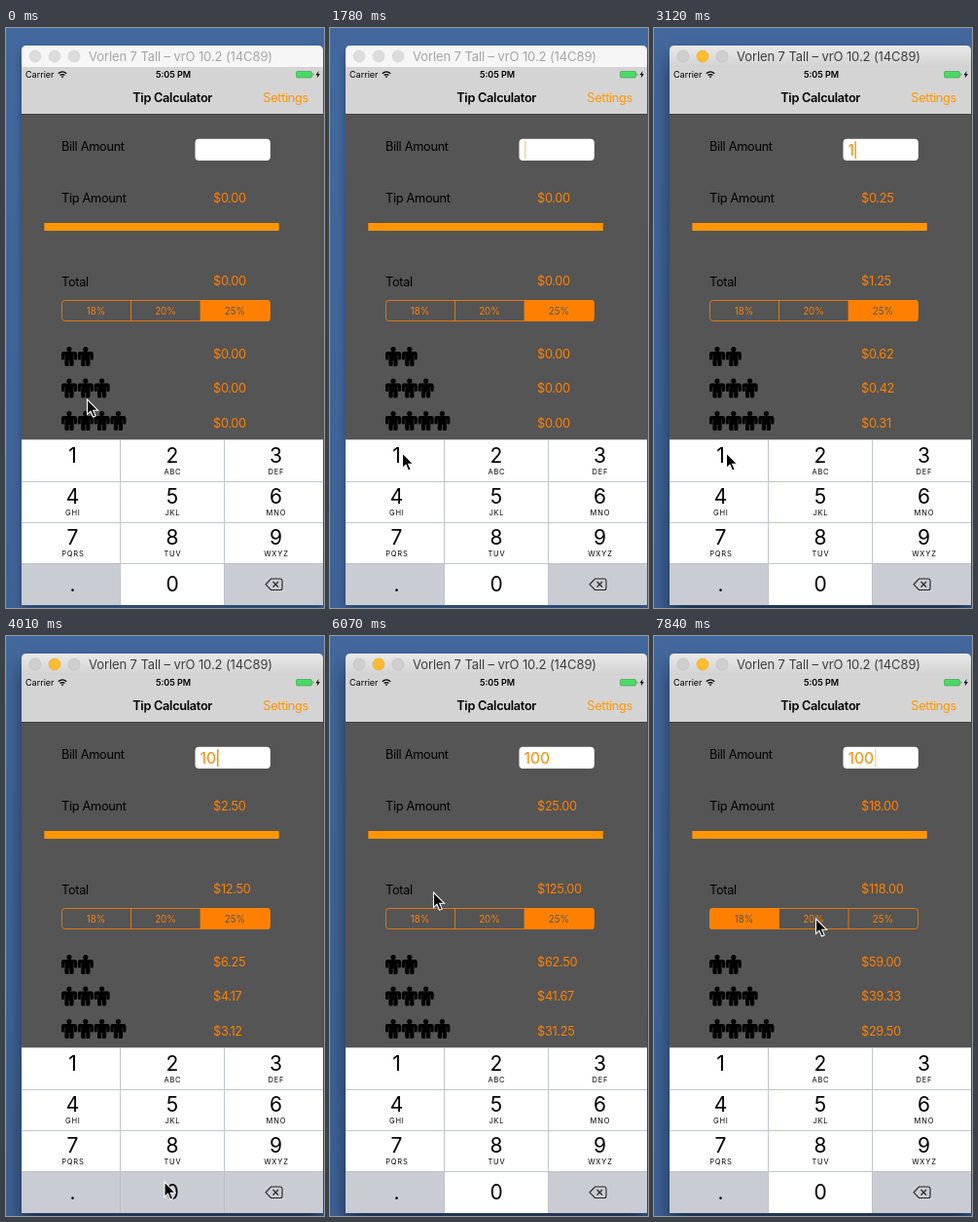
An HTML page for the animation above (7.99 s loop, 327 px wide and 595 px high).

```html
<!DOCTYPE html>
<html lang="en">
<head>
<meta charset="utf-8">
<title>Tip Calculator</title>
<style>
  html, body { margin: 0; width: 100%; height: 100%; overflow: hidden; }
  body { position: relative; background: linear-gradient(#43689d, #3f6296); }
  #window {
    position: absolute; left: 16px; top: 18px; width: 310px; height: 574px;
    border-radius: 5px 5px 0 0;
    box-shadow: 0 5px 9px rgba(0, 0, 0, .3);
  }
  .active #window { box-shadow: 0 13px 20px rgba(0, 0, 0, .5); }
  svg { position: absolute; left: 0; top: 0; }
  text { font: 12.75px Inter, sans-serif; letter-spacing: -.3px; }
  .mid { text-anchor: middle; }
  .end { text-anchor: end; }
  .bold { font-weight: 600; }
  .status { font-size: 9px; letter-spacing: 0; }
  .orange { fill: #ff9500; }
  .value { fill: #ff8000; }
  #bar { fill: #f6f6f6; }
  #caption { fill: #a6a6a6; font-size: 13px; letter-spacing: -.1px; }
  .light { fill: #dcdcdc; stroke: #d0d0d0; stroke-width: .6; }
  .active #bar { fill: url(#chrome); }
  .active #caption { fill: #3e3e3e; }
  .active .light { fill: #cfcfcf; stroke: #bcbcbc; }
  .active .yellow { fill: #fdbc30; stroke: #e6a92b; }
  #bill { fill: #ff8800; font-size: 16px; letter-spacing: 0; }
  .segment { fill: #ff8000; }
  .rate { font-size: 9.75px; letter-spacing: 0; }
  .digit { font-size: 21px; letter-spacing: 0; }
  .letters { font-size: 7.5px; letter-spacing: .8px; }
</style>
</head>
<body>
<div id="window"></div>
<svg width="327" height="595" viewBox="0 0 327 595">
  <defs>
    <linearGradient id="chrome" x2="0" y2="1">
      <stop stop-color="#e9e9e9"/><stop offset="1" stop-color="#d2d2d2"/>
    </linearGradient>
    <clipPath id="control"><rect x="57" y="279" width="215" height="22" rx="3.5"/></clipPath>
    <g id="person">
      <circle cx="8" cy="2.6" r="2.6"/>
      <path d="M2.2 5H13.8Q16 5 16 7.3V12q0 1.6-1.4 1.6-1.4 0-2-1v6q0 1.4-1.4 1.4H9.6q-1.2 0-1.2-1.2V14H7.6v4.8q0 1.2-1.2 1.2H4.8q-1.4 0-1.4-1.4v-6q-.6 1-2 1Q0 13.600 0 12V7.300Q0 5 2.200 5z"/>
      <path d="M3.4 8.500V12.600M12.600 8.500V12.600" stroke="#555" stroke-width=".5"/>
    </g>
  </defs>

  <path id="bar" d="M16 40V23q0-5 5-5H321q5 0 5 5V40z"/>
  <circle class="light" cx="30" cy="29" r="6"/>
  <circle class="light yellow" cx="50" cy="29" r="6"/>
  <circle class="light" cx="70" cy="29" r="6"/>
  <text id="caption" x="85" y="34">Vorlen 7 Tall – vrO 10.2 (14C89)</text>

  <rect x="16" y="40" width="310" height="48" fill="#d4d4d4"/>
  <text class="status" x="20" y="51">Carrier</text>
  <path d="M53.8 46.7q4.2-3.6 8.4 0M55.6 48.6q2.4-2 4.8 0" fill="none" stroke="#000" stroke-width="1.3"/>
  <path d="M56.7 49.8q1.3-1 2.6 0L58 51.3z"/>
  <text class="status bold mid" x="172" y="51">5:05 PM</text>
  <rect x="298.5" y="44.5" width="16" height="6.5" rx="1.2" fill="#4cd964" stroke="#3fa552" stroke-width=".7"/>
  <path d="M315.7 46.3q1.6 1.5 0 3z" fill="#444"/>
  <path d="M321.7 44l-3.2 4.2h2l-.9 3.3 3.3-4.3h-2z"/>
  <text class="bold mid" x="171.2" y="76">Tip Calculator</text>
  <text class="orange end" x="311" y="76">Settings</text>

  <rect x="16" y="88" width="310" height="334" fill="#555"/>
  <path d="M16 88.5H326" stroke="#444"/>
  <text x="57" y="126">Bill Amount</text>
  <text x="57" y="179">Tip Amount</text>
  <text x="57" y="265">Total</text>
  <rect x="194.5" y="113.7" width="77.3" height="22.3" rx="4" fill="#fff"/>
  <text id="bill" x="199.5" y="130.5"></text>
  <rect id="caret" y="116" width="1.5" height="18" fill="#ff8800"/>
  <rect class="orange" x="39.3" y="200" width="241.4" height="8"/>
  <g id="values"></g>
  <g id="segments"></g>
  <g id="people"></g>
  <g id="keys"></g>
  <path id="cursor" d="M0 0V15.4L3.5 12.2 6 18 8.7 16.9 6.2 11.2H11z" stroke="#fff" stroke-width="1.1"/>
</svg>

<script>
const LOOP = 7990;
const RATES = [18, 20, 25];
const CARET_X = [200, 206.5, 217, 227];
const $ = id => document.getElementById(id);

function add(parent, tag, attrs, content = '') {
  const node = document.createElementNS('http://www.w3.org/2000/svg', tag);
  for (const name in attrs) node.setAttribute(name, attrs[name]);
  node.textContent = content;
  return parent.appendChild(node);
}

const values = [179, 264, 339, 374, 410].map(y =>
  add($('values'), 'text', { class: 'value', x: 213, y }));

const segments = RATES.map((rate, i) => {
  const x = 57 + i * 71.5;
  const fill = add($('segments'), 'rect', {
    class: 'segment', x, y: 279, width: 71.5, height: 22, 'clip-path': 'url(#control)' });
  const label = add($('segments'), 'text', {
    class: 'rate mid', x: x + 35.5, y: 293.5 }, rate + '%');
  return { rate, fill, label };
});
add($('segments'), 'rect', {
  x: 57.5, y: 279.5, width: 214, height: 21, rx: 3,
  fill: 'none', stroke: '#ff8000', 'stroke-width': .8 });
add($('segments'), 'path', {
  d: 'M128.5 279.5v21M200 279.5v21', stroke: '#ff8000', 'stroke-width': .8 });

[327, 359.5, 393].forEach((y, row) => {
  for (let i = 0; i < row + 2; i++)
    add($('people'), 'use', { href: '#person', x: 57 + i * 16.8, y });
});

// Keypad: edges of the three columns and four rows.
const COLS = [16, 117.5, 224.5, 326];
const ROWS = [422, 465.5, 507.5, 549.5, 592];
const LETTERS = ['', 'ABC', 'DEF', 'GHI', 'JKL', 'MNO', 'PQRS', 'TUV', 'WXYZ'];
const keys = {};
[...'123456789.0<'].forEach((name, i) => {
  const col = i % 3, row = Math.floor(i / 3);
  const cx = [68.5, 171, 277.5][col];
  const base = [445.5, 488, 530, 577.5][row];
  const rest = '.<'.includes(name) ? '#c9ccd3' : '#fff';
  const rect = add($('keys'), 'rect', {
    x: COLS[col], y: ROWS[row],
    width: COLS[col + 1] - COLS[col], height: ROWS[row + 1] - ROWS[row] });
  keys[name] = { rect, rest };
  if (name === '<') return;
  add($('keys'), 'text', { class: 'digit mid', x: cx, y: base }, name);
  add($('keys'), 'text', { class: 'letters mid', x: cx + .4, y: base + 12 }, LETTERS[i] || '');
});
add($('keys'), 'path', {
  d: 'M117.5 422V592M224.5 422V592M16 422.5H326M16 465.5H326M16 507.5H326M16 549.5H326',
  stroke: '#bfc2c7', 'stroke-width': .8 });
add($('keys'), 'path', {
  d: 'M272.5 565H282q2 0 2 2v7.5q0 2-2 2h-9.5L267 570.8zM274.5 568l5.5 5.5m0-5.5l-5.5 5.5',
  fill: 'none', stroke: '#222', 'stroke-width': 1.1 });

// Tracks hold each value until the next entry: [time, ...value].
const pointer = [
  [0, 83.5, 381], [290, 80, 397], [440, 76, 428], [590, 74.5, 446], [730, 74.5, 440], [880, 74.5, 436],
  [3270, 90, 463], [3420, 125, 515], [3560, 153, 549], [3710, 163, 560],
  [4600, 218, 290], [4750, 247.8, 99.2], [5340, 245, 107], [5490, 241, 122], [5630, 235, 144],
  [5780, 204, 196], [5930, 143, 241], [6070, 106.5, 263], [6220, 96, 278], [6360, 92.5, 284.5],
  [7250, 98, 285], [7400, 116, 286], [7550, 142, 288], [7690, 160, 289], [7840, 166.5, 290]
];
const entry = [[0, ''], [2520, '1'], [4010, '10'], [4310, '100']];
const pressed = [[0, ''], [2370, '1'], [2520, ''], [4010, '0'], [4310, '']];
const earlyCaret = [
  [0, 0], [880, 1], [1330, 0], [1780, .4], [1930, 1],
  [3120, .85], [3270, 0], [3710, 1]
];
const at = (track, t) => track.findLast(step => step[0] <= t).slice(1);

function caretOpacity(t) {
  if (t < 4310) return at(earlyCaret, t)[0];
  const elapsed = Math.floor((t - 4305) / 147) * 147;
  const phase = (elapsed + 60) % 1000;
  if (phase < 540) return 1;
  if (phase < 640) return .35;
  return phase < 950 ? 0 : .5;
}

// Exact half cents round down.
const money = amount => '$' + Math.max(0, amount - 1e-9).toFixed(2);

function draw(t) {
  const [x, y] = at(pointer, t);
  const [bill] = at(entry, t);
  const [key] = at(pressed, t);
  const rate = t < 6810 ? 25 : 18;
  const tip = bill * rate / 100;
  const total = +bill + tip;

  document.body.classList.toggle('active', t >= 2220);
  $('cursor').setAttribute('transform', `translate(${x} ${y})`);
  $('bill').textContent = bill;
  $('caret').setAttribute('x', CARET_X[bill.length]);
  $('caret').setAttribute('opacity', caretOpacity(t));
  [tip, total, total / 2, total / 3, total / 4].forEach((amount, i) => {
    values[i].textContent = money(amount);
  });
  for (const s of segments) {
    const on = s.rate === rate;
    s.fill.setAttribute('opacity', on ? 1 : 0);
    s.label.setAttribute('fill', on ? '#555' : '#ff8000');
  }
  for (const name in keys)
    keys[name].rect.setAttribute('fill', name === key ? '#c9ccd3' : keys[name].rest);
}

let start;
function tick(now) {
  start ??= now;
  draw((now - start) % LOOP);
  requestAnimationFrame(tick);
}
draw(0);
requestAnimationFrame(tick);
</script>
</body>
</html>
```
